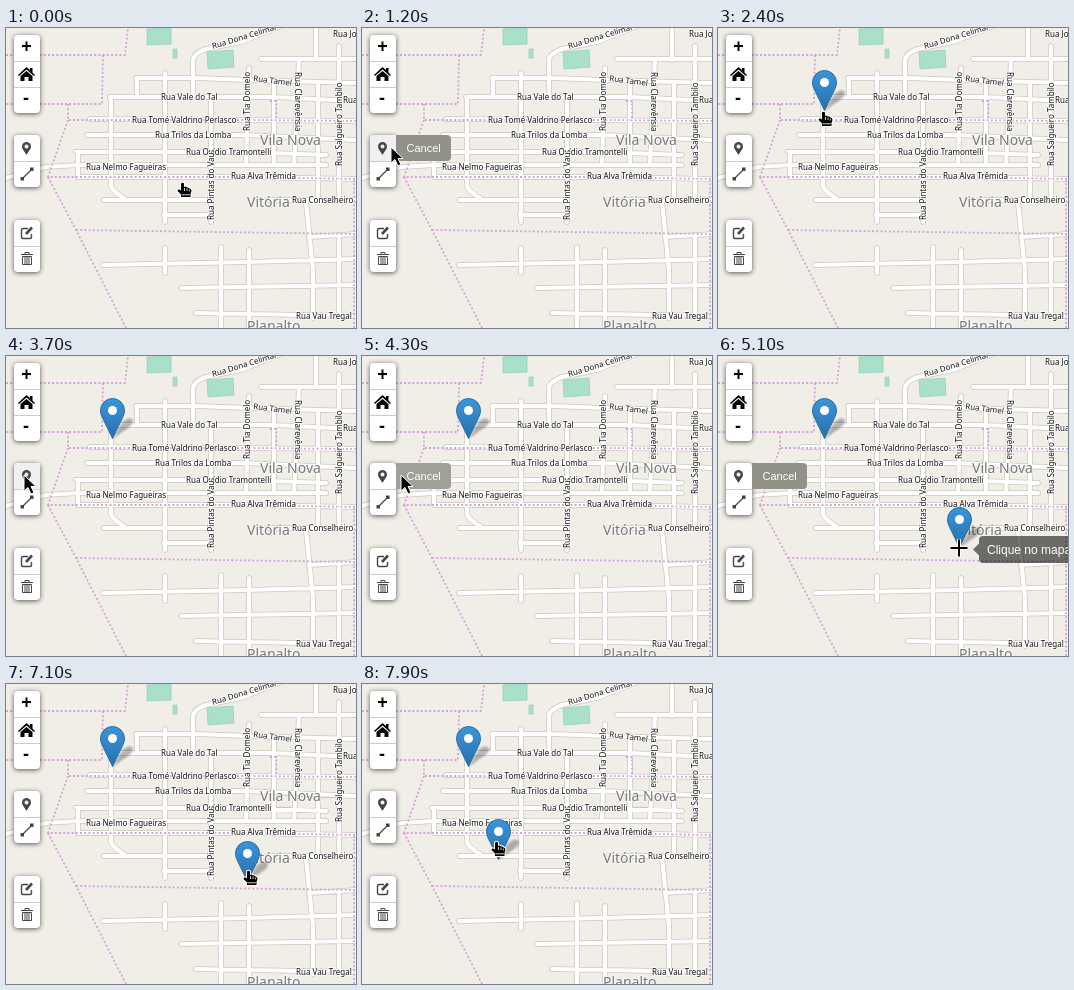
Write an HTML page that moves like this. It is 350 px wide and 300 px high and loops after 8000 ms.

```html
<!DOCTYPE html>
<html lang="pt">
<head>
<meta charset="utf-8">
<title>Mapa</title>
<style>
html, body { margin: 0; width: 100%; height: 100%; overflow: hidden; background: #f1eee8; }
svg { display: block; width: 350px; height: 300px; }
.road { fill: none; stroke-linecap: round; stroke-linejoin: round; }
.street { font: 8px "Noto Sans", sans-serif; fill: #111; stroke: #fff; stroke-width: 2px; stroke-opacity: .8; paint-order: stroke; stroke-linejoin: round; }
.area { font: 14px "Noto Sans", sans-serif; fill: #777; stroke: #fff; stroke-width: 2px; stroke-opacity: .6; paint-order: stroke; }
.ui { font-family: "Liberation Sans", Arial, sans-serif; fill: #fff; }
.bar { fill: #fff; filter: drop-shadow(0 1px 2.5px rgba(0,0,0,.65)); }
.zoom { font: bold 18px "Liberation Sans", Arial, sans-serif; text-anchor: middle; }
.shade { filter: blur(1.3px); opacity: .28; }
</style>
</head>
<body>
<svg viewBox="0 0 350 300">
  <defs>
    <linearGradient id="blue" x1="0" y1="0" x2="0" y2="1">
      <stop offset="0" stop-color="#3a95d8"/><stop offset="1" stop-color="#2670ae"/>
    </linearGradient>
    <g id="pin">
      <path class="shade" d="M0 0L9-16Q17-23 20-19T11-8z"/>
      <path d="M0-.5L-9.7-20.5C-10.8-22.8-12-25.4-12-28.5A12 12 0 0 1 12-28.5C12-25.4 10.8-22.8 9.7-20.5z" fill="url(#blue)" stroke="#2a6da6"/>
      <circle cy="-28.5" r="4.5" fill="#fff"/>
    </g>
  </defs>
  <rect width="350" height="300" fill="#f1eee8"/>
  <g fill="#aae0cb" stroke="#8fceb5" stroke-width=".7">
    <path d="M141 1L165 0V16L141 17z"/>
    <path d="M167 21H171V30H167z"/>
    <path d="M201 24L227 22L228 39L202 41z"/>
  </g>
  <g id="map"></g>
  <g id="labels"></g>

  <use id="pinA" href="#pin"/>
  <use id="pinB" href="#pin"/>

  <rect class="bar" x="8" y="7" width="26" height="78" rx="4"/>
  <rect class="bar" x="8" y="107" width="26" height="52" rx="4"/>
  <rect class="bar" x="8" y="192" width="26" height="52" rx="4"/>
  <path id="hover" d="M8 133V111a4 4 0 0 1 4-4H34V133z" fill="#f0f0f0"/>
  <path d="M8 33.5H34M8 59.5H34M8 133.5H34M8 218.5H34" stroke="#ccc"/>
  <text class="zoom" x="20.5" y="24">+</text>
  <text class="zoom" x="20" y="76">-</text>
  <path d="M12 47L20.5 39L24 42V40H26.5V44.5L29 47L28 48L20.5 41.5L13 48zM14.5 48L20.5 43L26.5 48V53H22.5V49H18.5V53H14.5z"/>
  <path d="M20.5 127C18 122.5 16 121 16 118.5A4.500 4.500 0 0 1 25 118.5C25 121 23 122.5 20.5 127zM20.5 116.5a2 2 0 1 0 .01 0z" fill="#464646" fill-rule="evenodd"/>
  <path d="M16.5 150.5L25.5 141.5" stroke="#464646" stroke-width="1.3"/>
  <path d="M14.5 149H18V152.5H14.5zM24 139.5H27.5V143H24z" fill="#464646"/>
  <g fill="none" stroke="#464646" stroke-width="1.4">
    <path d="M22 200.5H17Q15.5 200.5 15.5 202V209Q15.5 210.5 17 210.5H24Q25.5 210.5 25.5 209V206"/>
    <path d="M20 206L26 199.5" stroke-width="2.6"/>
    <path d="M15 226.5H27M19 226V224.5H23V226M16.5 228.5V236.5H25.5V228.5zM19 229V236M21 229V236M23 229V236" stroke-width="1"/>
  </g>

  <g id="cancel">
    <path id="cancelBox" d="M34 107H85a4 4 0 0 1 4 4V129a4 4 0 0 1-4 4H34z"/>
    <text class="ui" x="44.5" y="124" font-size="11">Cancel</text>
  </g>
  <g id="tip">
    <path d="M14 1.5L20-4.5V7.5zM24-12H260V15H24a4 4 0 0 1-4-4V-8a4 4 0 0 1 4-4z" opacity=".55"/>
    <text class="ui" x="28" y="6" font-size="12">Clique no mapa para posicionar o ponto.</text>
  </g>

  <g id="cursor" stroke="#fff" stroke-linejoin="round">
    <path id="arrow" d="M0 0V16L4 12.5L7 19L10 17.5L7 11.5H12z"/>
    <g id="hand">
      <path d="M-3 1.500Q-1.500 0 0 1.500V5Q2 4 3 5.500Q5 5 5.500 6.500Q7.500 6.500 7.500 9L6.500 12V15H-3V12.500L-6.500 9Q-6.500 7-4.500 7.500L-3 8.500z" stroke-width="2" paint-order="stroke"/>
      <path d="M.5 6V9M3 6.500V9M5.300 7.500V9.500M-2.500 12.800H6" stroke-width=".8"/>
    </g>
    <g id="cross">
      <path d="M-9 0H9M0-9V9" stroke-width="4"/>
      <path d="M-8.5 0H8.5M0-8.5V8.5" stroke="#000" stroke-width="2"/>
    </g>
  </g>
</svg>
<script>
const $ = id => document.getElementById(id);
const NS = 'http://www.w3.org/2000/svg';

function add(parent, tag, attrs, text) {
  const el = parent.appendChild(document.createElementNS(NS, tag));
  for (const k in attrs) el.setAttribute(k, attrs[k]);
  if (text) el.textContent = text;
}

const roads = [
  'M130 50H190L243 52L350 55M104 69H268L350 73M84 91L240 92L350 93',
  'M81 107H240L350 112M70 124H240L320 127M0 150L40 139L72 137H320',
  'M72 149H240L350 151M98 172H205M262 172H350M158 187H205',
  'M105 69V158Q106 163 118 170M131 50V69M72 124V149M159 45V194',
  'M187 69V32Q188 25 200 21L235 14L275-2M205 69V194M243 40L240 137',
  'M268 52V137M293 31L288 137M312 55V172M333 18V172M255 31H350M310 0V31',
  'M97 237L240 234L350 231M175 260L350 257M190 285L350 288',
  'M159 220V245M215 219V300M243 222V300M300 174L307 242V290M303 209L350 206M333 208V286'
].join('');
const limits = 'M0 27H119L122 0M97 27L96 76H0M62 76V92L240 92L350 93M62 92L42 149H240L350 151M42 149L70 202L120 300M70 202L350 206M348 151V300M264 73H270V92';

for (const [stroke, width] of [['#cbc7bf', 5.6], ['#fff', 4.2]])
  add($('map'), 'path', { class: 'road', d: roads, stroke, 'stroke-width': width });
add($('map'), 'path', { d: limits, fill: 'none', stroke: '#d3a3d4', 'stroke-width': 1.8, 'stroke-dasharray': '2 2.2' });

const label = (text, x, y, turn = 0, cls = 'street') =>
  add($('labels'), 'text', { class: cls, transform: `translate(${x} ${y}) rotate(${turn})` }, text);

label('Vila Nova', 254, 117, 0, 'area');
label('Vitória', 241, 179, 0, 'area');
label('Planalto', 241, 303, 0, 'area');
label('Rua Dona Celimar', 207, 21, -17);
label('Rua Vale do Tal', 155, 72);
label('Rua Tomé Valdrino Perlasco', 126, 95);
label('Rua Trilos da Lomba', 149, 110);
label('Rua Ovídio Tramontelli', 180, 127);
label('Rua Nelmo Fagueiras', 80, 142);
label('Rua Alva Trêmida', 225, 151);
label('Rua Conselheiro Zumbral', 286, 175);
label('Rua Vau Tregal', 290, 291);
label('Rua Tamel', 247, 53, 7);
label('Rua Jol', 327, 9);
label('Rua Jol', 337, 75);
label('Rua Pintas do Vau', 208, 192, -90);
label('Rua Tia Domelo', 244, 103, -90);
label('Rua Clarevênsia', 289, 44, 90);
label('Rua Salgueiro Tambilo', 336, 138, -90);

// Rows are [time, x, y]; a fourth value eases the way to the next row.
const mouse = [
  [200, 178, 154, 1], [900, 19, 119], [1100, 19, 119], [1300, 39, 119],
  [1400, 60, 117], [1600, 92, 103], [1800, 106, 90], [1900, 107, 87],
  [2000, 107, 86], [2100, 107, 83], [2900, 107, 83, 1], [3700, 18, 119],
  [4000, 18, 119], [4300, 39, 119], [4400, 62, 135], [4600, 140, 163],
  [4800, 222, 181], [4900, 241, 185], [5000, 241, 188], [5100, 241, 192],
  [5400, 242, 198], [5900, 242, 198], [6100, 243, 208], [6400, 243, 186],
  [7000, 243, 186], [7100, 244, 186, 1], [7900, 136, 157]
];
const drag = [[7100, 241.5, 198, 1], [7900, 136.5, 176]];

function at(keys, t) {
  if (t <= keys[0][0]) return keys[0].slice(1, 3);
  const i = keys.findIndex(k => k[0] > t);
  if (i < 0) return keys[keys.length - 1].slice(1, 3);
  const a = keys[i - 1], b = keys[i];
  let p = (t - a[0]) / (b[0] - a[0]);
  if (a[3]) p = p * p * (3 - 2 * p);
  return [a[1] + (b[1] - a[1]) * p, a[2] + (b[2] - a[2]) * p];
}

const show = (id, on) => $(id).style.display = on ? '' : 'none';
const place = (id, [x, y]) => $(id).setAttribute('transform', `translate(${x} ${y})`);

function draw(ms) {
  const t = Math.floor(ms / 100) * 100;
  const [x, y] = at(mouse, t).map(Math.round);
  const first = t >= 1200 && t < 2400, second = t >= 4100 && t < 5700;
  const drawing = first || second;
  const inRow = y >= 107 && y <= 133;
  const onCancel = drawing && x >= 34 && x < 89 && inRow;
  const onMap = x >= 34 && !onCancel;
  const live = drawing && onMap;

  show('pinA', t >= 2400 || first && live);
  place('pinA', t < 2400 ? [x - .5, y] : [106.5, 83]);
  show('pinB', t >= 5700 || second && live);
  place('pinB', t < 5700 ? [x + .5, y] : at(drag, t));

  show('hover', x < 34 && inRow);
  show('cancel', drawing);
  $('cancelBox').setAttribute('fill', onCancel ? '#a0a098' : '#919187');
  show('tip', live);
  place('tip', [x, y]);

  const kind = !onMap ? 'arrow' : second ? 'cross' : 'hand';
  for (const id of ['arrow', 'hand', 'cross']) show(id, id === kind);
  place('cursor', [x, y]);
}

const start = performance.now();
function tick() {
  draw((performance.now() - start) % 8000);
  requestAnimationFrame(tick);
}
tick();
</script>
</body>
</html>
```
